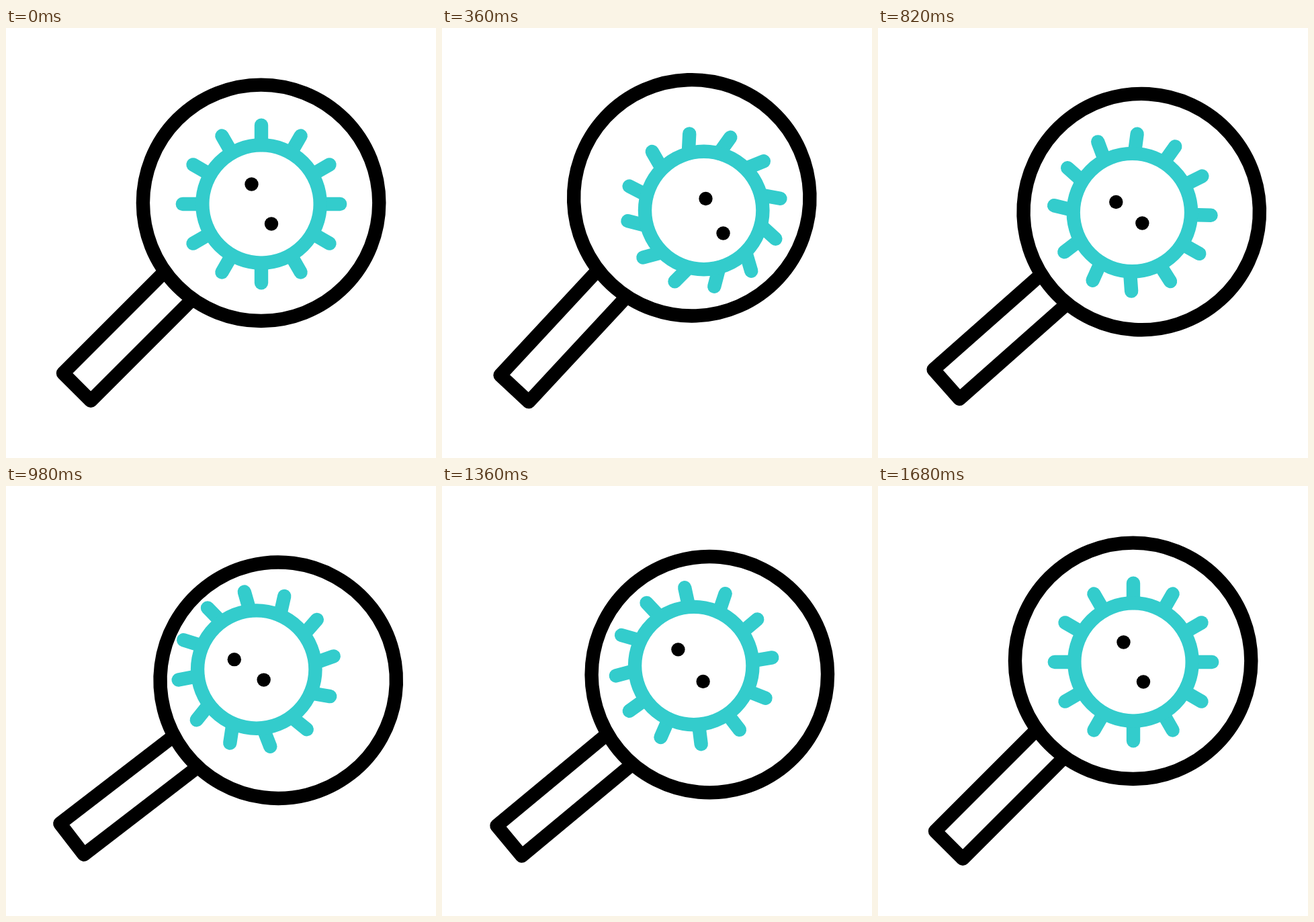
An HTML page with a canvas that plays this animation: 640x640 px, repeating every 1700 ms.

```html
<!DOCTYPE html>
<html lang="en">
<head>
<meta charset="utf-8">
<title>Magnifier and virus</title>
<style>
  html, body { margin: 0; height: 100%; overflow: hidden; background: #fff; }
  canvas { display: block; width: 100vmin; height: 100vmin; }
</style>
</head>
<body>
<canvas id="stage" width="640" height="640"></canvas>
<script>
const LOOP = 1700, TEAL = '#33cccc', DEG = Math.PI / 180;
const ctx = document.getElementById('stage').getContext('2d');

const part = (t, a, b) => Math.min(1, Math.max(0, (t - a) / (b - a)));
const smooth = x => x * x * (3 - 2 * x);

// Rest -> first -> second -> rest. `soft` sets the easing of the middle leg,
// `bow` bends the second and third legs away from a straight line.
function swing(t, [t1, t2, t3], first, second, soft = 1, bow = [0, 0]) {
  if (t < t1) return first * smooth(part(t, 0, t1));
  const mid = t < t2;
  const x = mid ? part(t, t1, t2) : part(t, t2, t3);
  const s = mid ? x + (smooth(x) - x) * soft : smooth(x);
  const from = mid ? first : second, to = mid ? second : 0;
  return from + (to - from) * s + bow[mid ? 0 : 1] * 4 * s * (1 - s);
}

function circle(x, y, r) {
  ctx.beginPath();
  ctx.arc(x, y, r, 0, 2 * Math.PI);
}

function drawSpikes(t) {
  const turn = swing(t, [485, 1083, 1690], 17.8, -8.5);
  for (let k = 0; k < 12; k++) {
    const tilt = swing(t - (11 - k) * 20, [320, 960, 1440], 30, -15);
    ctx.save();
    ctx.rotate((180 + turn + 30 * k) * DEG);
    ctx.translate(88, 0);
    ctx.rotate(tilt * DEG);
    ctx.beginPath();
    ctx.moveTo(0, 0);
    ctx.lineTo(29.2, 0);
    ctx.stroke();
    ctx.restore();
  }
}

function drawVirus(t) {
  const body = [450, 1080, 1685], eyes = [415, 1045, 1690];
  ctx.strokeStyle = TEAL;
  ctx.save();
  ctx.translate(380 + swing(t, body, 10.8, -9.5, 0.5),
                262 + swing(t, body, 10.6, 10, 0.5, [2.5, 0]));
  drawSpikes(t);
  circle(0, 0, 87.7);
  ctx.stroke();
  ctx.restore();

  circle(365.5 + swing(t, eyes, 28.3, -27.3),
         232.5 + swing(t, eyes, 22.6, 25.5, 1, [2.3, -2.3]), 10.2);
  ctx.fill();
  circle(395 + swing(t, eyes, 24.7, -12.4),
         291.5 + swing(t, eyes, 14.7, -3, 1, [-3.8, 1]), 10.2);
  ctx.fill();
}

function drawLens(t) {
  ctx.strokeStyle = '#000';
  ctx.save();
  ctx.translate(169.5, 472);
  ctx.rotate(swing(t, [540, 1085, 1690], -2.8, 9.4, 0.3) * DEG);
  ctx.translate(-169.5, -472);
  circle(379.6, 260.3, 175.7);
  ctx.stroke();
  ctx.beginPath();
  ctx.moveTo(234, 364.7);
  ctx.lineTo(85, 513.7);
  ctx.lineTo(126.2, 554.9);
  ctx.lineTo(275.5, 405.6);
  ctx.stroke();
  ctx.restore();
}

function frame(now) {
  const t = now % LOOP;
  ctx.fillStyle = '#fff';
  ctx.fillRect(0, 0, 640, 640);
  ctx.fillStyle = '#000';
  ctx.lineWidth = 20.4;
  ctx.lineCap = ctx.lineJoin = 'round';
  drawVirus(t);
  drawLens(t);
  requestAnimationFrame(() => frame(performance.now() - start));
}

const start = performance.now();
frame(0);
</script>
</body>
</html>
```
